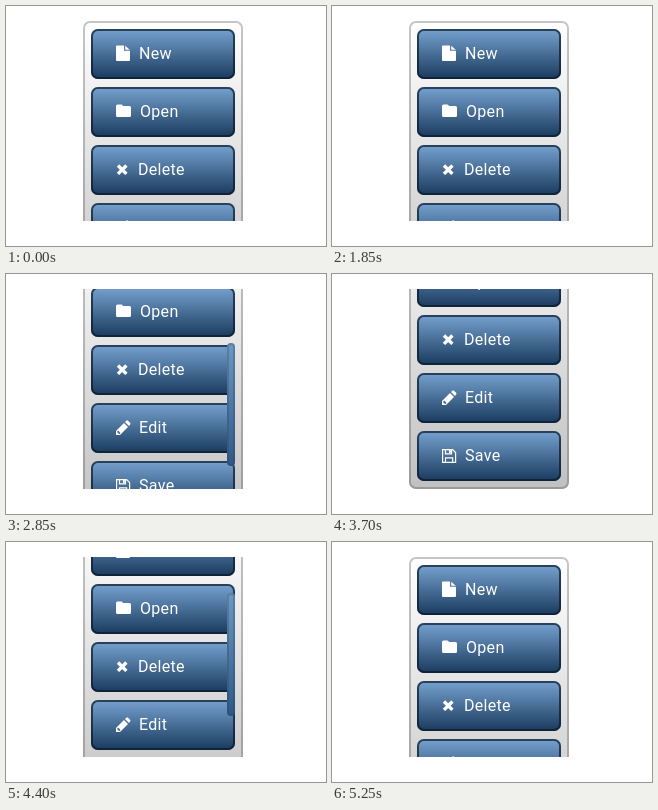
An HTML page that plays this animation: 320 by 240 pixels, repeating every 6 s.

```html
<!DOCTYPE html>
<html lang="en">
<head>
<meta charset="utf-8">
<title>Scrolling button list</title>
<style>
  html, body { margin: 0; width: 100%; height: 100%; overflow: hidden; background: #fff; }
  #view { position: absolute; left: 77px; top: 15px; width: 160px; height: 200px; overflow: hidden; }
  #list, .btn, #bar { position: absolute; box-sizing: border-box; }
  #list {
    left: 0; top: 0; width: 160px; height: 298px; border-radius: 7px;
    background: linear-gradient(#fff, #c0c0c0);
    box-shadow: inset 0 0 0 2px rgba(64, 64, 64, .3);
  }
  .btn {
    left: 8px; width: 144px; height: 50px; border-radius: 7px; color: #fff;
    background: linear-gradient(#76a2d0, #193a5d);
    box-shadow: inset 0 0 0 2px rgba(11, 25, 40, .7);
  }
  .btn.pressed { color: #a4b5c6; background: linear-gradient(#336294, #10263c); }
  .btn svg { position: absolute; left: 0; top: 0; }
  .btn span {
    position: absolute; top: 15px; white-space: pre;
    font: 16px/20px Roboto, sans-serif; letter-spacing: .3px;
  }
  #bar {
    left: 144px; top: 0; width: 8px; height: 123px; border-radius: 4px;
    background: linear-gradient(#6b9ac7, #2b598b);
    box-shadow: inset 0 0 0 2px rgba(64, 64, 64, .3);
  }
</style>
</head>
<body>
<div id="view"><div id="list"></div><div id="bar"></div></div>
<script>
const LOOP = 6000, RANGE = 98, TICK = 50;

const fill = d => `<path fill="currentColor" fill-rule="evenodd" d="${d}"/>`;
const items = [
  ['New', 48, fill('M26 16.5h7v5.3h6v9.2q0 1-1 1H26q-1 0-1-1V17.500q0-1 1-1zM34.200 16.700L38.800 20.800H34.200z')],
  ['Open', 49, fill('M26.500 17.500h4q1.300 0 1.300 1.500h6.700q1.500 0 1.500 1.500v8q0 1.500-1.500 1.500h-12q-1.500 0-1.500-1.500V19q0-1.500 1.500-1.500z')],
  ['Delete', 47, '<path stroke="currentColor" stroke-width="3.400" d="M27 20.500l8.400 8.400M35.400 20.500L27 28.900"/>'],
  ['Edit', 48, fill('M25 32v-4l8-8 4 4-8 8zM34 19l1.300-1.300q.9-.8 1.800 0l2 2q.8.900 0 1.800L38 23zM26.300 28.500v1.200h1.200v1.200h1l1-1-2.200-2.300z')],
  ['Save', 48, '<path fill="none" stroke="currentColor" stroke-width="1.200" d="M25.600 18.600h10l3 3v9.800h-13zM28.500 18.600v4.200h6v-4.200M28.500 31.400v-4.500h7.200v4.500"/>' + fill('M32 19h1.800v3H32z')]
];

// Button index, press time, release time
const presses = [[0, 800, 1150], [1, 1650, 1850], [2, 2450, 2600], [2, 4050, 4250]];

// Drag start, time the scrollbar hides, offset at each tick
const drags = [
  [2600, 3700, [13, 24, 35, 46, 57, 68, 79, 90, RANGE]],
  [4250, 5250, [85, 70, 54, 39, 26, 15, 6, 0]]
];

const list = document.getElementById('list');
const bar = document.getElementById('bar');

const buttons = items.map(([label, x, icon], i) => {
  const btn = document.createElement('div');
  btn.className = 'btn';
  btn.style.top = 8 + 58 * i + 'px';
  btn.innerHTML = `<svg width="48" height="50">${icon}</svg><span style="left:${x}px">${label}</span>`;
  return list.appendChild(btn);
});

function draw() {
  const t = performance.now() % LOOP;
  let offset = 0, dragging = false;
  for (const [start, hide, path] of drags) {
    if (t < start) break;
    offset = path[Math.min(path.length - 1, Math.floor((t - start) / TICK))];
    dragging = t < hide;
  }
  list.style.transform = `translateY(${-offset}px)`;
  bar.style.transform = `translateY(${12 + Math.round(61 * offset / RANGE)}px)`;
  bar.style.visibility = dragging ? 'visible' : 'hidden';
  buttons.forEach((btn, i) => btn.classList.toggle('pressed',
    presses.some(([n, down, up]) => n === i && t >= down && t < up)));
  requestAnimationFrame(draw);
}
draw();
</script>
</body>
</html>
```
